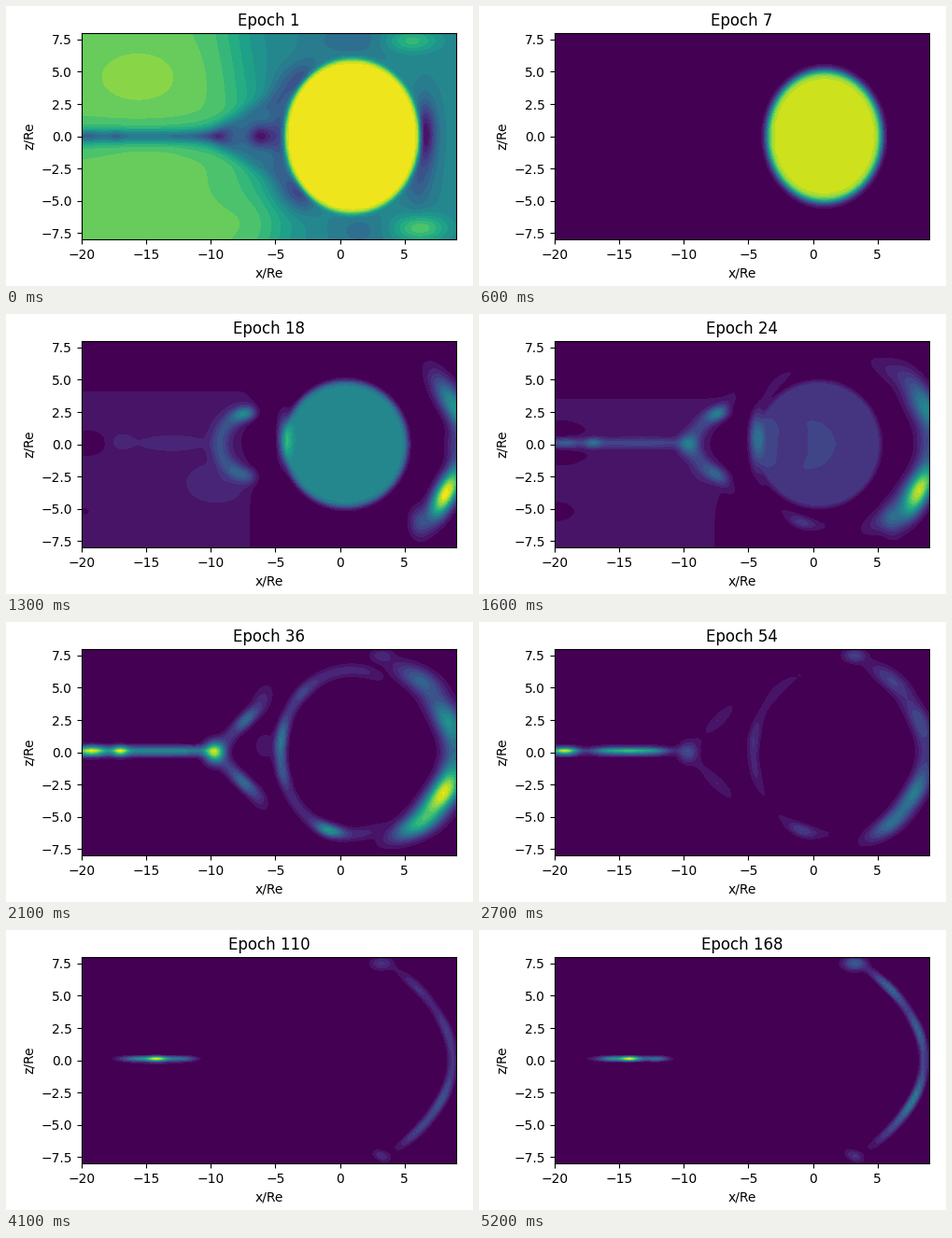
Recreate the animation shown at these times as a matplotlib script. Size 500x300 px, loop 5.3 s.

```python
import numpy as np
import matplotlib.pyplot as plt
from matplotlib.animation import FuncAnimation

W, H, DPI = 500, 300, 100
FRAMES, INTERVAL = 53, 100
LEVELS = np.linspace(0, 1, 21)

# The step between shown epochs grows as training goes on.
EPOCHS = [*range(1, 10), *range(10, 30, 2), *range(30, 60, 3),
          *range(60, 100, 4), *range(100, 150, 5), *range(150, 169, 6)]

# A coarse grid without a row at z = 0.
X, Z = np.meshgrid(np.linspace(-20, 9, 116), np.linspace(-8, 8, 64))


def key(epoch, *points):
    """Linear interpolation through (epoch, value) points."""
    return np.interp(epoch, *zip(*points))


def late(epoch, *values):
    """Interpolation over the settled part of the training."""
    return np.interp(epoch, (18, 36, 54, 110, 168), (0, *values))


def step(t):
    return 0.5 * (1 + np.tanh(t))


def bump(t, center, width):
    return np.exp(-0.5 * ((t - center) / width) ** 2)


def blob(cx, cz, sx, sz, angle=0):
    a = np.radians(angle)
    u = (X - cx) * np.cos(a) + (Z - cz) * np.sin(a)
    v = (Z - cz) * np.cos(a) - (X - cx) * np.sin(a)
    return np.exp(-0.5 * ((u / sx) ** 2 + (v / sz) ** 2))


def initial():
    """Error of the untrained model outside the planet."""
    f = 0.46 + 0.30 * step((-6.9 - X - 0.15 * Z) / 2.4)
    f += 0.06 * blob(-15.5, 4.6, 3.2, 2.0) + 0.04 * blob(-15, -2, 2, 1)
    f += 0.04 * blob(-20, -8, 4, 1.5) + 0.08 * blob(-5.5, -6.5, 2, 1.5)
    f += 0.22 * blob(5.5, 7.4, 1.4, 0.6) + 0.28 * blob(6.2, -7.1, 1.4, 0.7)
    tail = step((-9 - X) / 0.9)
    f -= tail * (0.29 * bump(Z, 0, 0.36) + 0.09 * bump(Z, 0, 0.9))
    f -= 0.08 * blob(-17.3, 0, 0.4, 0.4) + 0.08 * blob(-19.5, 0, 0.6, 0.4)
    fork = np.abs(Z) - 0.55 * (X + 10)
    f -= 0.2 * bump(fork, 0, 0.6) * step((X + 9.8) / 0.7) * step((-5.5 - X) / 1.2)
    f -= 0.25 * blob(-8.2, 0, 1.7, 0.7) + 0.36 * blob(-6.2, 0, 0.7, 0.8)
    f -= 0.27 * blob(-3.2, -4.4, 1.1, 0.9, -50) + 0.2 * blob(-3.2, 4.4, 1.2, 0.8, 50)
    f -= 0.22 * blob(-4.7, 0, 0.7, 2.5)
    f -= 0.42 * blob(6.6, 0.2, 0.6, 1.7) + 0.14 * blob(6, -3.5, 0.8, 1.5)
    f -= 0.1 * blob(1, 7.5, 2.2, 1) + 0.08 * blob(1.5, -7.3, 1.5, 1)
    return f


def planet(epoch):
    level = key(epoch, (1, 0.98), (7, 0.92), (15, 0.92), (18, 0.47), (24, 0.2), (36, 0))
    cx = key(epoch, (1, 0.95), (7, 0.88), (18, 0.45))
    rx = key(epoch, (1, 5.2), (7, 4.4), (18, 4.75))
    rz = key(epoch, (1, 5.95), (7, 5.05), (18, 4.85))
    soft = key(epoch, (1, 0.035), (7, 0.065), (18, 0.05))
    r = np.hypot((X - cx) / rx, Z / rz)
    return level, step((1 - r) / soft)


def haze():
    """Faint tail plasma."""
    f = 0.085 * step((-6.9 - X) / 0.6) * step((4.2 - Z) / 0.6)
    f -= 0.08 * blob(-19.5, 0.1, 1.2, 0.8) + 0.05 * blob(-20, -5.2, 0.8, 0.4)
    f += 0.05 * blob(-17, 0.2, 0.6, 0.4) + 0.04 * blob(-13, 0.1, 1.8, 0.4)
    f += 0.06 * blob(-9.5, -3, 1.4, 0.9) - 0.09 * blob(-6.3, 0.2, 0.9, 1.1)
    return f


def hook():
    """Open arc on the night side."""
    r = np.hypot((X + 6.6) / 2.7, Z / 2.5)
    f = 0.18 + 0.27 * blob(-7.3, 2.3, 0.7, 0.5) + 0.08 * blob(-7.6, -2.2, 0.7, 0.5)
    return f * bump(r, 1, 0.17) * step((-6.6 - X) / 0.5)


def crescents():
    """Two slanted lobes on the day side."""
    return (0.52 * blob(8.9, 2.9, 1.9, 0.6, -57) + blob(8.2, -3.8, 1.5, 0.55, 62)
            + 0.2 * blob(9.1, -0.2, 0.6, 1.4) + 0.2 * blob(6.1, -6, 0.5, 0.8))


def ring():
    r = np.hypot((X - 0.9) / 5.5, Z / 6.35)
    f = 0.13 + 0.28 * blob(-4.6, 1, 0.8, 1.2) + 0.15 * blob(-4.4, -1.5, 0.8, 0.8)
    f += 0.1 * blob(-3, 4.7, 0.9, 0.9) + 0.42 * blob(-0.9, -6.1, 0.8, 0.6)
    return f * bump(r, 1, 0.055) * step((3 - X) / 1)


def wings():
    f = 0.36 * blob(-7.3, 2.5, 0.9, 0.32, 45) + 0.36 * blob(-7.5, -2.3, 0.9, 0.32, -45)
    f += 0.14 * blob(-8.8, 0.9, 0.7, 0.4, 50) + 0.14 * blob(-8.8, -0.9, 0.7, 0.4, -50)
    f += 0.11 * blob(-6, 4.1, 0.9, 0.5, 65) + 0.11 * blob(-6.3, -3.5, 0.8, 0.4, -60)
    return f + 0.075 * blob(-5.8, 0.5, 0.7, 0.9)


def sheet(epoch):
    """Thin current sheet along the tail."""
    f = late(epoch, 0.4, 0.08, 0, 0) * step((-9.9 - X) / 0.8)
    f += late(epoch, 0.58, 0.86, 0, 0) * bump(X, -19.2, 0.7)
    f += late(epoch, 0.55, 0, 0, 0) * bump(X, -17, 0.4)
    f += late(epoch, 0.1, 0.55, 0.42, 0.3) * np.exp(-((X + 14.2) / 2.8) ** 4)
    f += late(epoch, 0, 0.06, 0.56, 0.7) * bump(X, -14.2, 0.5)
    f += late(epoch, 0, 0, 0.1, 0.25) * bump(X, -15.6, 0.5)
    f += late(epoch, 0, 0, 0.08, 0.2) * bump(X, -12, 0.5)
    width = key(epoch, (36, 0.24), (54, 0.18), (110, 0.12), (168, 0.09))
    return f * bump(Z, 0.1, width)


def bow(epoch):
    """Curved boundary on the day side."""
    c = key(epoch, (36, 8.9), (54, 8.75), (110, 8.7), (168, 8.6))
    width = key(epoch, (36, 0.7), (54, 0.5), (110, 0.23), (168, 0.2))
    k = np.where(Z < 0, 0.09, 0.086)
    d = (X - c + k * Z ** 2) / np.hypot(1, 2 * k * Z)
    f = late(epoch, 0.3, 0.2, 0.16, 0.35) * bump(Z, 5.6, 0.9)
    f += late(epoch, 0.5, 0.24, 0.2, 0.33) * bump(Z, 2.4, 1.3)
    f += late(epoch, 0.2, 0.1, 0.12, 0.15) * bump(Z, -0.3, 1.2)
    f += late(epoch, 0.95, 0.42, 0.28, 0.44) * bump(Z, -3.2, 1.4)
    f += late(epoch, 0.45, 0.28, 0.16, 0.12) * bump(Z, -5.7, 0.8)
    return f * bump(d, 0, width)


def field(epoch):
    level, disk = planet(epoch)
    f = np.exp((1 - epoch) / 1.5) * initial() * (1 - disk) + level * disk
    f += key(epoch, (7, 0), (14, 0.7), (18, 1), (28, 0.4), (36, 0)) * haze()
    f += key(epoch, (7, 0), (14, 0.6), (18, 1), (36, 0)) * hook()
    f += key(epoch, (7, 0), (12, 0.15), (15, 0.75), (18, 1), (36, 0)) * crescents()
    f += key(epoch, (10, 0), (18, 0.35), (36, 0)) * blob(-4.3, 0.5, 0.35, 1.2)
    f += late(epoch, 1, 0.38, 0, 0) * ring()
    f += late(epoch, 1, 0.28, 0, 0) * wings()
    f += late(epoch, 0.75, 0.22, 0, 0) * blob(-9.7, 0, 0.5, 0.55)
    f += sheet(epoch) + bow(epoch)
    f += late(epoch, 0.12, 0.2, 0.16, 0.3) * blob(3.2, 7.5, 0.6, 0.35)
    f += late(epoch, 0, 0, 0.14, 0.17) * blob(3.2, -7.4, 0.5, 0.25, -25)
    return np.clip(f, 0, 0.999)


fig = plt.figure(figsize=(W / DPI, H / DPI), dpi=DPI)
ax = fig.add_axes([80.7 / W, 49.7 / H, 401.4 / W, 221.4 / H])


def draw(i):
    epoch = EPOCHS[i]
    ax.clear()
    ax.contourf(X, Z, field(epoch), levels=LEVELS, cmap="viridis", vmin=0.025, vmax=1)
    ax.set(xlim=(-20, 9), ylim=(-8, 8), xlabel="x/Re", ylabel="z/Re",
           xticks=np.arange(-20, 6, 5), yticks=np.arange(-7.5, 8, 2.5),
           title=f"Epoch {epoch}")


anim = FuncAnimation(fig, draw, frames=FRAMES, interval=INTERVAL, init_func=lambda: None,
                     repeat=True, repeat_delay=0, blit=False)
plt.show()
```
